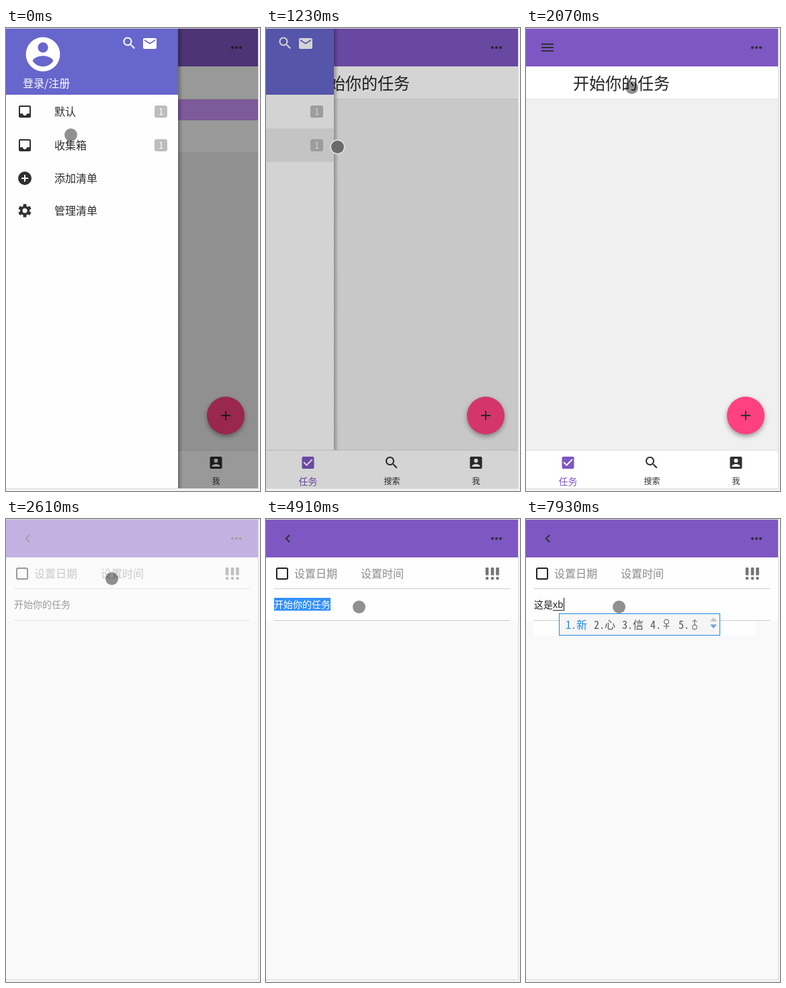
Recreate the animation shown at these times as an HTML page with a canvas. Size 378x687 px, loop 8000 ms.

```html
<!DOCTYPE html>
<html lang="zh-CN">
<head>
<meta charset="utf-8">
<title>任务清单</title>
<style>
html, body { margin: 0; width: 100%; height: 100%; overflow: hidden; background: #f3f3f3; }
canvas { display: block; width: 378px; height: 687px; }
</style>
</head>
<body>
<canvas id="stage"></canvas>
<script>
const W = 378, H = 687, LOOP = 8000;
const canvas = document.getElementById('stage');
const ctx = canvas.getContext('2d');
const ratio = window.devicePixelRatio || 1;
canvas.width = W * ratio;
canvas.height = H * ratio;

const SANS = '"Noto Sans CJK SC", "Noto Sans CJK JP", sans-serif';
const MONO = '"Noto Sans Mono CJK SC", "Noto Sans CJK SC", monospace';
const PURPLE = '#7e57c2', INK = '#303030', PAPER = '#f9f9f9';

// 24-unit icon outlines
const ICONS = {
  search: 'M15.5 14h-.79l-.28-.27C15.41 12.59 16 11.11 16 9.5 16 5.91 13.09 3 9.5 3S3 5.91 3 9.5 5.91 16 9.5 16c1.61 0 3.09-.59 4.23-1.57l.27.28v.79l5 4.99L20.49 19l-4.99-5zm-6 0C7.01 14 5 11.99 5 9.5S7.01 5 9.5 5 14 7.01 14 9.5 11.99 14 9.5 14z',
  mail: 'M20 4H4c-1.1 0-2 .9-2 2v12c0 1.1.9 2 2 2h16c1.1 0 2-.9 2-2V6c0-1.1-.9-2-2-2zm0 4l-8 5-8-5V6l8 5 8-5v2z',
  person: 'M12 2a10 10 0 1 0 0 20a10 10 0 1 0 0-20zm0 3a3 3 0 1 1 0 6a3 3 0 1 1 0-6zm0 14.2c-2.5 0-4.71-1.28-6-3.22.03-1.99 4-3.08 6-3.08 1.99 0 5.97 1.09 6 3.08-1.29 1.94-3.5 3.22-6 3.22z',
  inbox: 'M19 3H5c-1.1 0-2 .9-2 2v14c0 1.1.9 2 2 2h14c1.1 0 2-.9 2-2V5c0-1.1-.9-2-2-2zm0 12h-4c0 1.66-1.35 3-3 3s-3-1.34-3-3H5V5h14v10z',
  add: 'M12 2a10 10 0 1 0 0 20a10 10 0 1 0 0-20zm5 11h-4v4h-2v-4H7v-2h4V7h2v4h4v2z',
  check: 'M19 3H5c-1.1 0-2 .9-2 2v14c0 1.1.9 2 2 2h14c1.1 0 2-.9 2-2V5c0-1.1-.9-2-2-2zm-9 14l-5-5 1.41-1.41L10 14.17l7.59-7.59L19 8l-9 9z',
  card: 'M3 5v14c0 1.1.9 2 2 2h14c1.1 0 2-.9 2-2V5c0-1.1-.9-2-2-2H5c-1.1 0-2 .9-2 2zm12 4a3 3 0 1 1-6 0a3 3 0 1 1 6 0zm-9 8c0-2 4-3.1 6-3.1s6 1.1 6 3.1v1H6v-1z'
};
for (const k in ICONS) ICONS[k] = new Path2D(ICONS[k]);
ICONS.gear = gearPath();

function gearPath() {
  const p = new Path2D();
  for (let i = 0; i < 6; i++) {
    const mid = i * Math.PI / 3 + Math.PI / 6 * 3;
    for (const [d, r] of [[-.36, 7], [-.24, 10], [.24, 10], [.36, 7]]) {
      const x = 12 + r * Math.cos(mid + d), y = 12 + r * Math.sin(mid + d);
      i || d > -.36 ? p.lineTo(x, y) : p.moveTo(x, y);
    }
  }
  p.closePath();
  p.moveTo(15.5, 12);
  p.arc(12, 12, 3.5, 0, 7);
  return p;
}

function box(x, y, w, h, fill) {
  ctx.fillStyle = fill;
  ctx.fillRect(x, y, w, h);
}
function round(x, y, w, h, r, fill) {
  ctx.fillStyle = fill;
  ctx.beginPath();
  ctx.roundRect(x, y, w, h, r);
  ctx.fill();
}
function disc(x, y, r, fill) {
  ctx.fillStyle = fill;
  ctx.beginPath();
  ctx.arc(x, y, r, 0, 7);
  ctx.fill();
}
function line(points, color, width) {
  ctx.strokeStyle = color;
  ctx.lineWidth = width;
  ctx.beginPath();
  points.forEach(([x, y], i) => i ? ctx.lineTo(x, y) : ctx.moveTo(x, y));
  ctx.stroke();
}
// y is the vertical centre of the glyphs
function text(s, x, y, size, color, weight = 400, align = 'left', family = SANS) {
  ctx.font = `${weight} ${size}px ${family}`;
  ctx.textAlign = align;
  ctx.fillStyle = color;
  ctx.fillText(s, x, y + size * .38);
  return ctx.measureText(s).width;
}
function icon(name, cx, cy, color, size = 24) {
  ctx.save();
  ctx.translate(cx - size / 2, cy - size / 2);
  ctx.scale(size / 24, size / 24);
  ctx.fillStyle = color;
  ctx.fill(ICONS[name], 'evenodd');
  ctx.restore();
}

// Value of the latest step at or before t
function at(steps, t) {
  let value = steps[0][1];
  for (const [start, v] of steps) if (t >= start) value = v;
  return value;
}

const POINTER = [
  [0, [96.5, 158.5]], [150, [106.5, 176.5]], [1650, [112.5, 166]], [1800, [130, 128]],
  [1920, [145, 98]], [2070, [157.5, 88.5]], [3060, [150, 108]], [3180, [138.5, 130.5]]
];
const DRAWER = [[0, 256], [1230, 101], [1380, 9], [1500, 1], [1650, 0]];
const DIM = [[0, .4], [1230, .17], [1380, .035], [1500, 0]];
const SHOWN = [[0, 1], [2370, .6], [2490, .12], [2610, .44], [2760, .82], [2910, .94], [3060, .97], [3330, 1]];
const CARET = [[0, 0], [3480, 1], [3910, 0], [4470, 1], [4910, 0], [5840, 1], [6250, 0], [6810, 1]];
const INPUT = [
  [0, { done: '开始你的任务' }],
  [4910, { done: '开始你的任务', selected: true }],
  [5840, { done: '' }],
  [7080, { done: '', typing: 'zh' }],
  [7230, { done: '', typing: 'zhe' }],
  [7380, { done: '', typing: 'zhes' }],
  [7660, { done: '这是' }],
  [7930, { done: '这是', typing: 'xb' }]
];
const POPUP = [
  [0, null],
  [7080, { x: 29, w: 240, words: ['这', '着', '者', '折', '浙'] }],
  [7380, { x: 29, w: 312, words: ['这是', '这时', '这事', '这世', '这'] }],
  [7660, null],
  [7930, { x: 49, w: 240, words: ['新', '心', '信', '♀', '♂'] }]
];
const PATCH = [[0, 0], [7080, 269], [7380, 341]];

function appBar() {
  box(0, 1, 375, 56, PURPLE);
  for (const x of [337, 343, 349]) disc(x, 29, 2.1, INK);
}

function listPage(second) {
  box(0, 1, 375, 682, '#f0f0f0');
  appBar();
  for (const y of [24, 29, 34]) box(23, y - 1, 18, 2, INK);
  box(0, 57, 375, 48, '#fff');
  box(0, 105, 375, 1, '#e4e4e4');
  if (second) {
    text('开始你的任务', 70, 82, 24, '#222');
  } else {
    box(0, 106, 375, 31, '#d096ff');
    box(0, 137, 375, 48, '#fff');
    box(0, 185, 375, 1, '#e4e4e4');
  }
  ctx.save();
  ctx.shadowColor = 'rgba(0,0,0,.38)';
  ctx.shadowBlur = 7 * ratio;
  ctx.shadowOffsetY = 3 * ratio;
  disc(327, 575, 28, '#ff4081');
  ctx.restore();
  box(320, 574, 14, 2, INK);
  box(326, 568, 2, 14, INK);
}

function tabBar() {
  box(0, 627, 375, 56, '#fff');
  box(0, 626, 375, 1, '#dcdcdc');
  icon('check', 62.5, 645, PURPLE);
  icon('search', 187, 645, INK);
  icon('card', 312.5, 645, INK);
  text('任务', 62.5, 673, 14, PURPLE, 400, 'center');
  text('搜索', 187.5, 672, 12, INK, 400, 'center');
  text('我', 312.5, 672, 12, INK, 400, 'center');
}

function drawer(width, pressed) {
  ctx.save();
  ctx.translate(width - 256, 0);
  const shade = ctx.createLinearGradient(256, 0, 263, 0);
  shade.addColorStop(0, 'rgba(0,0,0,.28)');
  shade.addColorStop(1, 'rgba(0,0,0,0)');
  box(256, 1, 7, 682, shade);
  box(0, 1, 256, 682, '#fefefe');
  box(0, 1, 256, 98, '#6666cc');
  if (pressed) box(0, 149, 256, 50, '#ebebeb');
  icon('person', 55, 39, '#fff', 61);
  icon('search', 183.5, 22.5, '#fff');
  icon('mail', 214, 23, '#fff');
  text('登录/注册', 25, 82, 16, '#fff');
  [['inbox', '默认', 124, 1], ['inbox', '收集箱', 174, 1], ['add', '添加清单', 223], ['gear', '管理清单', 271]]
    .forEach(([name, label, y, count]) => {
      icon(name, 28, y, INK);
      text(label, 72, y, 16, '#2b2b2b');
      if (!count) return;
      round(221, y - 9, 19, 18, 3, '#bdbdbd');
      text(count, 230.5, y + .5, 13, '#fff', 400, 'center');
    });
  ctx.restore();
}

function home(t) {
  const width = at(DRAWER, t), closing = t >= 1230, pressed = t >= 1110;
  listPage(pressed);
  if (closing && width) drawer(width, pressed);
  tabBar();
  box(0, 1, 375, 682, `rgba(0,0,0,${at(DIM, t)})`);
  if (!closing) drawer(width, pressed);
}

// Gender signs with an upright stem; dir 1 hangs down, -1 points up
function sign(x, y, dir) {
  ctx.strokeStyle = '#555';
  ctx.lineWidth = 1;
  ctx.beginPath();
  ctx.arc(x, y - 4 * dir, 3.5, 0, 7);
  ctx.stroke();
  line([[x, y - dir * .5], [x, y + 7 * dir]], '#555', 1);
  if (dir > 0) line([[x - 4.5, y + 2.5], [x + 4.5, y + 2.5]], '#555', 1);
  else line([[x - 3.5, y - 3.5], [x, y - 7], [x + 3.5, y - 3.5]], '#555', 1);
}

function triangle(x, y, dir, fill) {
  ctx.fillStyle = fill;
  ctx.beginPath();
  ctx.moveTo(x - 5, y - 3 * dir);
  ctx.lineTo(x + 5, y - 3 * dir);
  ctx.lineTo(x, y + 3 * dir);
  ctx.fill();
}

function popup({ x, w, words }) {
  box(x, 140, w, 33, '#2389e6');
  box(x + 1, 141, w - 2, 31, '#f5f5f5');
  let left = x + 10;
  words.forEach((word, i) => {
    const color = i ? '#555' : '#2389e6';
    text(`${i + 1}.`, left, 157, 16, color, 300, 'left', MONO);
    if (word === '♀') sign(left + 24, 156.5, 1);
    else if (word === '♂') sign(left + 24, 156.5, -1);
    else text(word, left + 16, 156.5, 16, color, 300);
    left += 26 + 16 * word.length;
  });
  triangle(x + w - 10, 149, -1, '#c4c4c4');
  triangle(x + w - 10, 159.5, 1, '#73a5d8');
}

function field(t) {
  const { done, typing, selected } = at(INPUT, t);
  if (selected) box(12, 117, 84, 19, '#3390ff');
  let x = 12;
  if (done) x += text(done, 12, 127, 14, selected ? '#fff' : '#222', selected ? 400 : 350);
  else if (!typing) text('准备做什么', 12, 127, 14, '#757575', 300);
  if (typing) {
    const width = text(typing, x, 127, 14, '#222');
    box(x, 135, width, 1, '#222');
    x += width;
  }
  if (at(CARET, t)) box(Math.round(x), 117, 1, 19, '#111');
}

function detail(t) {
  box(0, 1, 375, 682, PAPER);
  box(0, 57, 375, 94, '#fefefe');
  const patch = at(PATCH, t);
  if (patch) box(12, 151, patch - 12, 22, '#fefefe');
  appBar();
  line([[35, 23.8], [29.8, 29], [35, 34.2]], INK, 2);
  ctx.strokeStyle = '#222';
  ctx.lineWidth = 2;
  ctx.beginPath();
  ctx.roundRect(16, 73, 16, 16, 1.5);
  ctx.stroke();
  text('设置日期', 42, 81, 16, '#8c8c8c', 300);
  text('设置时间', 141, 81, 16, '#8c8c8c', 300);
  for (const x of [329, 337, 344.5]) {
    round(x - 2.3, 72, 4.6, 11.5, 1, '#757575');
    disc(x, 88, 2.3, '#757575');
  }
  box(12, 103, 351, 1, '#ccc');
  box(12, 150, 351, 1, '#ccc');
  field(t);
}

function pointer(t) {
  const [x, y] = at(POINTER, t);
  if (t >= 1230 && t < 1380) {
    disc(x, y, 11, '#e2e2e2');
    disc(x, y, 9.5, '#6b6b6b');
  } else disc(x, y, 9.5, 'rgba(0,0,0,.43)');
}

function draw(t) {
  ctx.setTransform(ratio, 0, 0, ratio, 0, 0);
  box(0, 0, W, H, '#f3f3f3');
  box(0, 0, 376, 684, '#dcdcdc');
  (t < 2610 ? home : detail)(t);
  ctx.globalAlpha = 1 - at(SHOWN, t);
  box(0, 1, 375, 682, PAPER);
  ctx.globalAlpha = 1;
  pointer(t);
  const list = at(POPUP, t);
  if (list) popup(list);
}

const begin = performance.now();
function tick() {
  draw((performance.now() - begin) % LOOP);
  requestAnimationFrame(tick);
}
tick();
</script>
</body>
</html>
```
